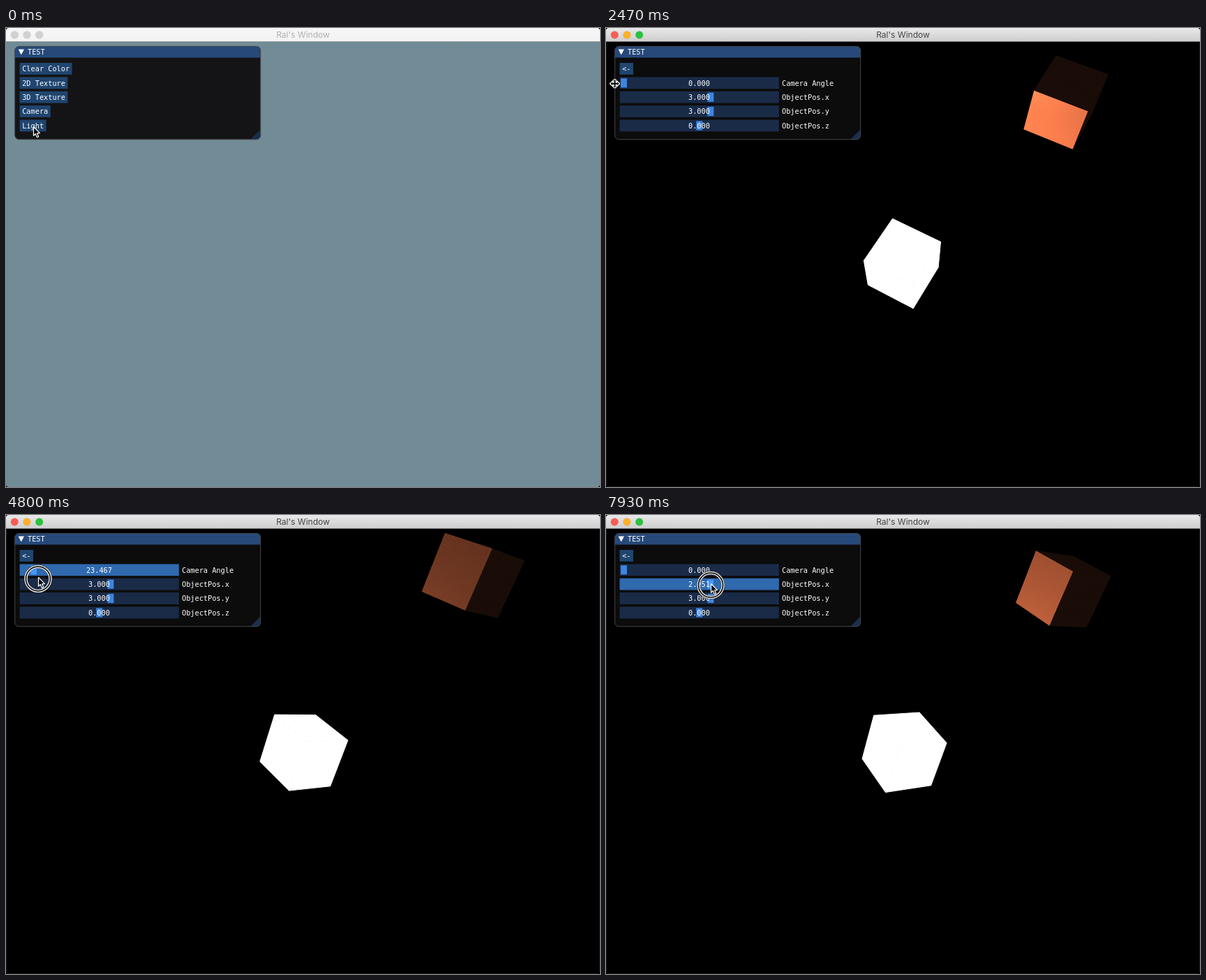
An HTML page with a canvas that plays this animation: 851x658 px, repeating every 8000 ms.

```html
<!DOCTYPE html>
<html lang="en">
<head>
<meta charset="utf-8">
<title>Cube lighting demo</title>
<style>
  html, body { margin: 0; width: 100%; height: 100%; overflow: hidden; background: #000; }
  canvas { display: block; }
</style>
</head>
<body>
<canvas id="stage" width="851" height="658"></canvas>
<script>
const ctx = document.getElementById('stage').getContext('2d');
const W = 851, H = 658, BAR = 19.5, LOOP = 8000, FPS = 15;
const SCENE_START = 340, FOCUS_START = 70;
const CX = 425.5, CY = 338.5, FOCAL = 770.7, DIST = 10;
const AXIS = [0.662, 0.2, 0.721];
const MONO = '10.25px "DejaVu Sans Mono", monospace';

// Slider geometry
const LEFT = 19.6, TRACK = 228.2, GRAB_MIN = 25.5, GRAB_RANGE = 216.3;
const rowY = i => 50 + i * 20.38, ROW_H = 16.8;

// The drawn pointer trails the panel, and the panel trails the scene (ms)
const PANEL_LEAD = 80, SCENE_LEAD = 145;

const SPIN = [[0, 3.135], [1600, 4.743], [2470, 5.583], [3870, 7], [5870, 9.01], [6730, 9.87], [7930, 11.045], [8000, 11.115]];
const POINTER = [
  [0, 39, 142], [900, 39, 142], [1600, 332, 232], [1800, 332, 232], [2470, 11, 79], [2700, 5, 80],
  [3400, 35, 86], [3500, 36.2, 86], [4300, 66.256, 88], [4500, 70, 89], [5200, 14, 91], [5500, 0, 95],
  [6150, 0, 95], [6730, 77, 87], [7000, 77, 87], [7500, 150, 99], [8000, 150, 99]
];
const PRESSES = [[200, SCENE_START], [3530, 6150], [7700, LOOP]];

const lerp = (a, b, k) => a + (b - a) * k;
const clamp = (v, lo, hi) => Math.min(hi, Math.max(lo, v));
const dot = (a, b) => a[0] * b[0] + a[1] * b[1] + a[2] * b[2];
const add = (a, b, k = 1) => a.map((v, i) => v + b[i] * k);
const unit = a => { const l = Math.hypot(...a); return a.map(v => v / l); };

// Interpolates rows of [time, value...]
function track(keys, t) {
  let i = 1;
  while (i < keys.length - 1 && keys[i][0] < t) i++;
  const a = keys[i - 1], b = keys[i];
  const k = clamp((t - a[0]) / (b[0] - a[0]), 0, 1);
  return a.slice(1).map((v, j) => lerp(v, b[j + 1], k));
}

// ---- 3D ----
function spinAxes(angle) {
  const c = Math.cos(angle), s = Math.sin(angle), [x, y, z] = unit(AXIS), u = 1 - c;
  return [
    [c + u * x * x, u * x * y + s * z, u * x * z - s * y],
    [u * x * y - s * z, c + u * y * y, u * y * z + s * x],
    [u * x * z + s * y, u * y * z - s * x, c + u * z * z]
  ];
}

function orbit([x, y, z], a) {
  const c = Math.cos(a), s = Math.sin(a);
  return [x * c - z * s, y, x * s + z * c];
}

function project([x, y, z]) {
  const k = FOCAL / (DIST - z);
  return [CX + x * k, CY - y * k];
}

function tracePath(points) {
  ctx.beginPath();
  points.forEach(p => ctx.lineTo(...p));
  ctx.closePath();
}

function fillPoly(points, color, edge) {
  tracePath(points);
  ctx.fillStyle = ctx.strokeStyle = color;
  ctx.lineWidth = edge;
  ctx.fill();
  ctx.stroke();
}

// Phong shading with the light at the world origin
function shade(p, n) {
  const toLight = unit(p.map(v => -v));
  const toEye = unit([-p[0], -p[1], DIST - p[2]]);
  const facing = dot(n, toLight);
  const mirror = n.map((v, i) => 2 * facing * v - toLight[i]);
  const spec = facing > 0 ? 0.5 * Math.max(0, dot(mirror, toEye)) ** 32 : 0;
  const light = 0.1 + Math.max(0, facing) + spec;
  return 'rgb(' + [255, 128, 79].map(v => Math.round(Math.min(255, v * light))).join() + ')';
}

function visibleFaces(center, axes) {
  const faces = [];
  for (let i = 0; i < 3; i++) for (const side of [-1, 1]) {
    const n = axes[i].map(v => v * side);
    const mid = add(center, n, 0.5);
    if (dot(n, [-mid[0], -mid[1], DIST - mid[2]]) <= 0) continue;
    const u = axes[(i + 1) % 3], v = axes[(i + 2) % 3];
    const at = (a, b) => add(add(mid, u, a - 0.5), v, b - 0.5);
    faces.push({ n, at, outline: [at(0, 0), at(1, 0), at(1, 1), at(0, 1)].map(project) });
  }
  return faces;
}

function drawLitCube(center, axes) {
  const N = 14;
  for (const { n, at, outline } of visibleFaces(center, axes)) {
    ctx.save();
    tracePath(outline);
    ctx.clip();
    for (let i = 0; i < N; i++) for (let j = 0; j < N; j++) {
      const cell = [[i, j], [i + 1, j], [i + 1, j + 1], [i, j + 1]].map(([a, b]) => project(at(a / N, b / N)));
      fillPoly(cell, shade(at((i + 0.5) / N, (j + 0.5) / N), n), 1);
    }
    ctx.restore();
  }
}

function drawScene(s) {
  const turn = s.sceneCamera * Math.PI / 180;
  const axes = spinAxes(s.spin).map(a => orbit(a, turn));
  drawLitCube(orbit([s.objX, 3, 0], turn), axes);
  visibleFaces([0, 0, 0], axes).forEach(f => fillPoly(f.outline, '#fff', 1));
}

// ---- Interface ----
function text(str, x, y, color = '#fff', align = 'left', font = MONO) {
  ctx.font = font;
  ctx.textAlign = align;
  ctx.fillStyle = color;
  ctx.fillText(str, x, y);
}

function rect(x, y, w, h, color) {
  ctx.fillStyle = color;
  ctx.fillRect(x, y, w, h);
}

function titleBar(active) {
  const g = ctx.createLinearGradient(0, 0, 0, BAR);
  g.addColorStop(0, active ? '#e9e9e9' : '#f6f6f6');
  g.addColorStop(1, active ? '#cdcdcd' : '#f3f3f3');
  rect(0, 0, W, BAR, g);
  const lights = active ? ['#fc5b55', '#fdb128', '#2ac23e'] : ['#d1d1d1', '#d1d1d1', '#d1d1d1'];
  lights.forEach((color, i) => {
    ctx.beginPath();
    ctx.arc(12.3 + i * 17.7, 9.9, 5.4, 0, 7);
    ctx.fillStyle = color;
    ctx.fill();
    ctx.lineWidth = 0.5;
    ctx.strokeStyle = 'rgba(0,0,0,0.12)';
    ctx.stroke();
  });
  text("Ral's Window", 425.5, 14.2, active ? '#454545' : '#b0b0b0', 'center', '12px Inter, sans-serif');
}

function panel(bg) {
  const frame = new Path2D();
  frame.roundRect(12.7, 26.3, 352, 133.5, 6);
  ctx.save();
  ctx.clip(frame);
  rect(12, 26, 354, 135, bg);
  rect(12, 26, 354, 16.5, '#26497a');
  tracePath([[365, 145], [365, 160], [350, 160]]);
  ctx.fillStyle = '#1a2e4d';
  ctx.fill();
  ctx.restore();
  ctx.lineWidth = 1;
  ctx.strokeStyle = '#46464c';
  ctx.stroke(frame);
  tracePath([[17.7, 30.6], [26, 30.6], [21.8, 38.4]]);
  ctx.fillStyle = '#fff';
  ctx.fill();
  text('TEST', 31, 38.4);
}

function button(label, row, color = '#20456f') {
  ctx.font = MONO;
  rect(LEFT, rowY(row), ctx.measureText(label).width + 7.1, ROW_H, color);
  text(label, LEFT + 3.6, rowY(row) + 12.2);
}

function slider(label, row, value, fraction, state) {
  const y = rowY(row);
  rect(LEFT, y, TRACK, ROW_H, { idle: '#1a2b48', hover: '#20446c', active: '#2f69ae' }[state]);
  rect(GRAB_MIN + fraction * GRAB_RANGE - 4.4, y + 1.8, 8.9, ROW_H - 3.6, state === 'active' ? '#4296fa' : '#3d85e0');
  text(value.toFixed(3), LEFT + TRACK / 2 - 0.3, y + 12.2, '#fff', 'center');
  text(label, 252, y + 12.2);
}

function drawSliders(s) {
  const rows = [
    ['Camera Angle', s.camera, s.camera / 360],
    ['ObjectPos.x', s.objX, s.objX / 40 + 0.5],
    ['ObjectPos.y', 3, 0.575],
    ['ObjectPos.z', 0, 0.5]
  ];
  button('<-', 0);
  rows.forEach(([label, value, fraction], i) => {
    const y = rowY(i + 1);
    const over = s.x >= LEFT && s.x <= LEFT + TRACK && s.y >= y && s.y <= y + ROW_H + 0.5;
    const state = s.dragRow === i ? 'active' : over && !s.pressed ? 'hover' : 'idle';
    slider(label, i + 1, value, fraction, state);
  });
}

function drawPointer({ x, y, pressed, resizing }) {
  if (pressed) {
    const ring = (r, w, color) => {
      ctx.beginPath();
      ctx.arc(x + (resizing ? -3 : 0), y + (resizing ? 0 : 1.6), r, 0, 7);
      ctx.lineWidth = w;
      ctx.strokeStyle = color;
      ctx.stroke();
    };
    ring(17.6, 5, '#000');
    ring(19, 1.5, '#e8e8e8');
    ring(16, 1.5, '#e8e8e8');
  }
  ctx.save();
  ctx.translate(x, y);
  ctx.lineJoin = 'round';
  if (resizing) {
    tracePath([[-7, 0], [-3, -4], [-3, -1.5], [-1.5, -1.5], [-1.5, -6], [1.5, -6], [1.5, -1.5], [3, -1.5], [3, -4],
      [7, 0], [3, 4], [3, 1.5], [1.5, 1.5], [1.5, 6], [-1.5, 6], [-1.5, 1.5], [-3, 1.5], [-3, 4]]);
  } else {
    tracePath([[0.5, -0.5], [0.5, 12.3], [3.3, 9.7], [5.5, 14.7], [7.7, 13.7], [5.6, 8.9], [9.4, 8.7]]);
  }
  ctx.fillStyle = '#000';
  ctx.fill();
  ctx.lineWidth = 1.2;
  ctx.strokeStyle = '#fff';
  ctx.stroke();
  ctx.restore();
}

const pressAt = t => PRESSES.findIndex(([a, b]) => t >= a && t < b);

function cameraAt(t) {
  if (pressAt(t) !== 1) return 0;
  return clamp((track(POINTER, t)[0] - GRAB_MIN) / GRAB_RANGE * 360, 0, 360);
}

function stateAt(t) {
  const [x, y] = track(POINTER, t);
  const press = pressAt(t);
  return {
    x, y,
    pressed: press >= 0,
    dragRow: press >= 1 ? press - 1 : null,
    resizing: x < 15,
    spin: track(SPIN, t)[0],
    camera: cameraAt(t + PANEL_LEAD),
    sceneCamera: cameraAt(t + SCENE_LEAD),
    objX: press === 2 ? 2.951 : 3
  };
}

function draw(t) {
  const s = stateAt(t);
  const inScene = t >= SCENE_START;
  const focused = t >= FOCUS_START - 5;
  rect(0, 0, W, H, '#000');
  ctx.save();
  ctx.beginPath();
  ctx.roundRect(0, 0, W, H, 4);
  ctx.clip();
  rect(0, BAR, W, H - BAR, inScene ? '#000' : '#728c97');
  if (inScene) {
    drawScene(s);
    ctx.lineWidth = 1;
    ctx.strokeStyle = '#1c1c1c';
    ctx.strokeRect(0.5, 0.5, W - 1, H - 1);
  }
  panel(inScene ? '#0c0c0c' : '#141416');
  if (inScene) {
    drawSliders(s);
  } else {
    ['Clear Color', '2D Texture', '3D Texture', 'Camera'].forEach((label, i) => button(label, i));
    button('Light', 4, focused ? '#4296fa' : undefined);
  }
  titleBar(focused);
  drawPointer(s);
  ctx.restore();
}

function frame() {
  const t = performance.now() % LOOP;
  // Steps at 15 per second, on times rounded to 10 ms
  draw(Math.floor((t + 5) * FPS / 1000) * 1000 / FPS);
  requestAnimationFrame(frame);
}
frame();
</script>
</body>
</html>
```
